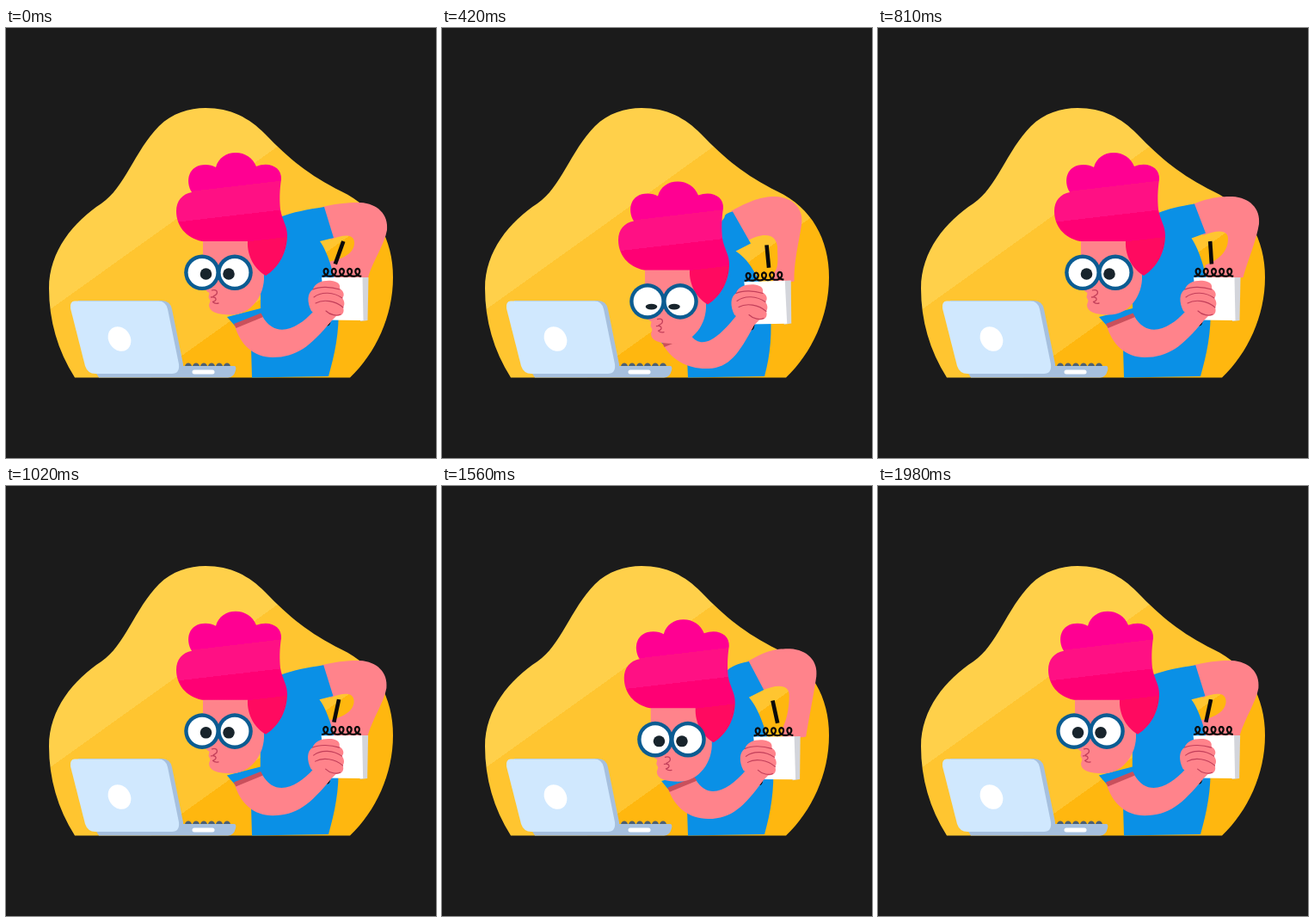
An HTML page with a canvas for the animation above (2.01 s loop, 500x500 px).

```html
<!DOCTYPE html>
<html lang="en">
<head>
<meta charset="utf-8">
<title>Peeking at the laptop</title>
<style>
  html, body { margin: 0; width: 100%; height: 100%; overflow: hidden; background: #1b1b1b; }
  canvas { display: block; }
</style>
</head>
<body>
<canvas id="stage" width="500" height="500"></canvas>
<script>
const ctx = document.getElementById('stage').getContext('2d');
const LOOP = 2010, TICK = 30, STEP = 40, CYCLE = 24;
const SKIN = '#ff838b', LINE = '#c23f5a', BLUE = '#0a90e6', RIM = '#0b5c92', INK = '#0a0a0a';

// Flat colour bands; each entry is [start, colour]
function bands(x0, y0, x1, y1, list) {
  const g = ctx.createLinearGradient(x0, y0, x1, y1);
  list.forEach(([start, color], i) => {
    g.addColorStop(start, color);
    g.addColorStop(i + 1 < list.length ? list[i + 1][0] : 1, color);
  });
  return g;
}
const sun = bands(0, 0, 290, 405, [[0, '#ffd04a'], [0.594, '#ffc530'], [0.861, '#ffb70f']]);
const hairTint = bands(260, 145, 277, 290,
  [[0, '#ff0092'], [0.27, '#ff1084'], [0.5, '#ff0074'], [0.72, '#ff0a60']]);

function fill(color, d) {
  ctx.fillStyle = color;
  ctx.fill(new Path2D(d));
}
function stroke(color, width, d) {
  ctx.strokeStyle = color;
  ctx.lineWidth = width;
  ctx.lineCap = ctx.lineJoin = 'round';
  ctx.stroke(new Path2D(d));
}
function oval(color, x, y, rx, ry = rx, turn = 0) {
  ctx.fillStyle = color;
  ctx.beginPath();
  ctx.ellipse(x, y, rx, ry, turn, 0, Math.PI * 2);
  ctx.fill();
}
function group(x, y, draw) {
  ctx.save();
  ctx.translate(x, y);
  draw();
  ctx.restore();
}

// Eases 0 -> 1 -> 0 with its peak at `top`
function bump(p, from, top, to) {
  if (p <= from || p >= to) return 0;
  const k = p < top ? (p - from) / (top - from) : (to - p) / (to - top);
  return (1 - Math.cos(Math.PI * k)) / 2;
}

function drawLaptop() {
  fill('#a6c0de', 'M104 400 L200 393 H266 Q268 394 267 398 Q265 406.5 258 406.5 H108Z');
  for (let x = 212; x < 260; x += 9) {
    fill('#4c6074', `M${x - 4} 393 Q${x - 3} 389.5 ${x} 389.5 Q${x + 3} 389.5 ${x + 4} 393Z`);
  }
  stroke('#ffffff', 5, 'M219 400 H240');
  fill('#a6c0de', 'M84 317 H181 Q191 317 193 327 L206 391 Q207 402 198 402 H104Z');
  fill('#d0e8fe', 'M80 317.5 H177 Q186 317.5 188 327 L201 391 Q202 402 193 402 H104 Q95 402 92 393 L75 326 Q74 317.5 80 317.5Z');
  oval('#ffffff', 132, 361.5, 12.5, 15, -0.6);
}

function drawBackArm(q, s, u) {
  const px = 368 - 15 * s, py = 290 + 4.5 * s;
  const reach = Math.min(32, 2 + 36 * s + 21 * u);
  const jx = px + reach, jy = py - 18 + 0.3 * reach;
  fill(SKIN, `M${q(368, 208, -30, 8, -4, -6)}
    C${q(390, 203, -25, 2, -4, -14)} ${q(402, 203, -25, 0, -4, -14)} ${q(412, 203, -24, 0, 0, -14)}
    C${q(432, 204, -24, 0, 0, -14)} ${q(445, 217, -24, 0, 0, -14)} ${q(443, 235, -25, 1, 0, -14)}
    C${q(440, 252, -25, 2, 0, -10)} ${q(427, 270, -21, 2, 6, 0)} ${px + 53 + 7 * u} ${py}
    L${jx} ${py + 4} L${jx} ${jy}
    C${q(391, 270, -4, 8, 11, 0)} ${q(405, 262, -17, 9, 4, -5)} ${q(405, 250, -17, 9, 4, -9)}
    C${q(405, 239, -19, 4, 5, -10)} ${q(392, 240, -22, 3, 5, -11)} ${q(378, 246, -24, 7, 0, -10)}Z`);
}

function drawTorso(q) {
  fill(BLUE, `M286 406.5 L${q(285, 372, 0, 12)} L${q(265, 345, -9, 22)} L${q(257, 336, -6, 23)}
    L${q(296, 326, -9, 22)} L${q(296, 240, 0, 22)} L${q(318, 220, 2, 6, 16, -10)}
    C${q(334, 214, -8, 9, 8, -8)} ${q(350, 211, -24, 9, 0, -7)} ${q(370, 208, -30, 9, -4, -7)}
    L${q(381, 244, -22, 12, 0, -11)} L${q(365, 248, -23, 15, -1, -7)}
    C${q(374, 260, -14, 13, 0, -4)} ${q(384, 290, -14, 5)} ${q(386.5, 322, -5, 2)}
    C${q(388, 354, -4, 0)} 382 380 375 405Z`);
}

function drawPencil(p) {
  const a = Math.PI * p / 3;
  const tip = 389 - 6.2 * Math.cos(a) - 4.8 * Math.sin(a);
  const lean = 2 + 7.5 * Math.cos(a);
  ctx.lineCap = 'butt';
  ctx.strokeStyle = INK;
  ctx.lineWidth = 4.6;
  ctx.beginPath();
  ctx.moveTo(tip + lean, 248);
  ctx.lineTo(tip, 274.5);
  ctx.stroke();
}

function drawCoil() {
  ctx.beginPath();
  for (let a = 0; a <= Math.PI * 10; a += 0.2) {
    ctx.lineTo(367.5 + 1.46 * a + 4.5 * Math.sin(a), 284.3 + 4.4 * Math.cos(a));
  }
  ctx.strokeStyle = INK;
  ctx.lineWidth = 2.2;
  ctx.stroke();
}

function drawPad(s, p) {
  group(390 - 15 * s, 315 + 4.5 * s, () => {
    ctx.rotate(-0.03 * s);
    ctx.translate(-390, -315);
    drawPencil(p);
    fill('#d3d5db', 'M411 290 L421.5 290 L420.5 340 L412 341Z');
    fill('#ffffff', 'M367 290 L414.5 290 L415.5 340 L372 339.5Z');
    drawCoil();
    stroke(INK, 1.4, 'M370 344 Q376 349 377 340');
  });
}

function drawFrontArm(q, s) {
  fill(SKIN, `M${q(266, 346, -9, 22)}
    C${q(272, 368, -5, 18)} ${q(288, 383, -2, 14)} ${q(310, 383, 0, 13)}
    C${q(338, 383, -4, 12)} ${q(354, 370, -9, 9)} ${q(378, 341, -15, 4.5)}
    L${q(358, 329, -15, 4.5)}
    C${q(340, 349, -14, 6)} ${q(314, 363, -10, 15)} ${q(298, 335, -9, 22)}Z`);
  fill('#c9505c', `M${q(265, 344, -9, 22)} L${q(296.5, 331.5, -9, 22)}
    L${q(299, 336, -9, 22)} L${q(267.5, 349, -9, 22)}Z`);
  group(1 - 15 * s, 4.5 * s, () => {
    fill(SKIN, `M354 329 C349 319 349 308 356 304 C358 296 368 293 378 294
      C385 295 388 298 387 303 C392 306 393 311 390 314 C393 318 393 322 391 325
      C393 331 390 335 383 335 L374 344Z`);
    stroke(LINE, 1.1, `M356 304 C364 300 377 301 387 304 M357 313 C366 306 380 307 390 314
      M359 320 C368 315 382 317 391 325 M371 329 C376 334 384 335 388 333`);
  });
}

function drawHead(s, u) {
  group(14 * u, 33.6 * s, () => {
    fill(SKIN, `M229 242 H297 L300 288 C301 310 286 333.5 261 333.5 C246 333.5 236 330 236 322
      L237.5 317 L235.5 313 L236.5 308 C232 306 229.5 301 229 294Z`);
    fill(hairTint, `M228 248 C209 244 198 230 198 213 C198 201 205 193 216 191
      C208 178 212 159 232 159 Q239 159 244 162 C247 151 256 145 267 145
      C278 145 287 151 291 161 C306 155 321 162 320 176 C318 190 318 200 319 211
      C321 223 327 230 327 241 C327 260 318 278 302 288 C290 281 280 266 281 248Z`);

    group(6 * u + s, 0, () => {
      stroke(LINE, 1.3, 'M239.5 305 C246 303 248 309 241 312 M238.5 313 C245 312 246 317 240.5 318.5 Q243 321 247 320');
      const squash = s * s;
      [[228, 4.5], [266, -7]].forEach(([x, look]) => {
        oval(RIM, x, 284.3, 20.8);
        oval('#ffffff', x, 284.3, 16.4);
        oval('#18242c', x + look, 286 + 4.5 * squash, 6.8, 6.8 - 3.4 * squash);
      });
    });
  });
}

function draw(p) {
  const s = bump(p, 0, 10, 18);   // leaning down
  const u = bump(p, 4, 16, 24);   // pulling back
  const q = (x, y, sx = 0, sy = 0, ux = 0, uy = 0) =>
    `${x + sx * s + ux * u} ${y + sy * s + uy * u}`;

  ctx.fillStyle = '#1b1b1b';
  ctx.fillRect(0, 0, 500, 500);
  fill(sun, `M80 406.5 C60 375 50 340 50 303 C50 259 79 225 111 204 C138 186 150 142 178 114
    C193 99 213 93 232 93 C261 93 283 104.5 301 123 C329 152 352 171 390 190
    C430 209 450 246 450 290 C450 335 430 378 400 406.5Z`);
  drawLaptop();
  drawBackArm(q, s, u);
  drawTorso(q);
  drawPad(s, p);
  drawFrontArm(q, s);
  drawHead(s, u);
}

function tick() {
  const t = performance.now() % LOOP;
  const step = Math.floor(Math.floor(t / TICK) * TICK / STEP);
  draw(step % CYCLE);
  requestAnimationFrame(tick);
}
tick();
</script>
</body>
</html>
```
